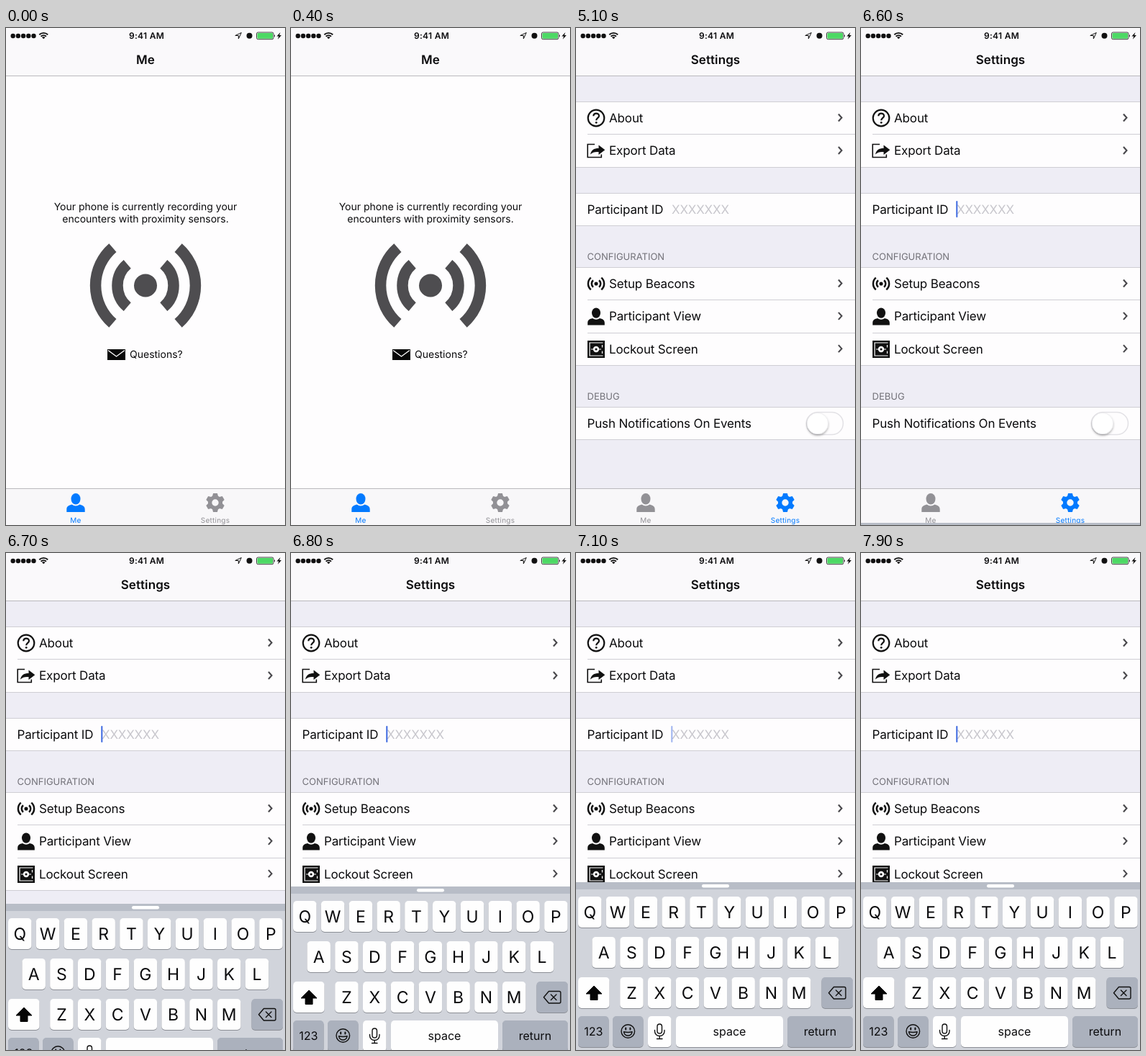
Recreate the animation shown at these times as an HTML page. Size 388 px wide and 690 px high, loop 8000 ms.

```html
<!DOCTYPE html>
<html lang="en">
<head>
<meta charset="utf-8">
<title>Settings walkthrough</title>
<style>
  html, body { margin: 0; width: 100%; height: 100%; overflow: hidden; background: #fefdfe; }
  svg { display: block; width: 388px; height: 690px; }
  text { font: 17px Inter, "Liberation Sans", sans-serif; letter-spacing: -.15px; fill: #0b0b0d; text-rendering: geometricPrecision; }
  .mid { text-anchor: middle; }
  .title { font-weight: 600; letter-spacing: .1px; }
  .note { font-size: 14px; letter-spacing: 0; }
  .head { font-size: 13px; letter-spacing: 0; fill: #717077; }
  .hint { fill: #c7c6cc; letter-spacing: -.2px; }
  .tab { font-size: 10px; letter-spacing: .25px; fill: currentColor; }
  .clock { font-size: 12px; font-weight: 600; letter-spacing: .3px; }
  .letter { font-size: 23px; letter-spacing: 0; }
  .word { font-size: 16px; letter-spacing: 0; }
  .line { fill: none; stroke: #111; }
</style>
</head>
<body>
<svg viewBox="0 0 388 690">
  <defs>
    <g id="signal">
      <circle r="16" fill="currentColor"/>
      <g id="waves" fill="none" stroke="currentColor" stroke-width="15.5">
        <path d="M25.3-29.7A39 39 0 0 1 25.3 29.7M45.6-52.4A69.5 69.5 0 0 1 45.6 52.4"/>
      </g>
      <use href="#waves" transform="scale(-1 1)"/>
    </g>
    <g id="person" fill="currentColor">
      <ellipse cy="-5.3" rx="6.5" ry="7.7"/>
      <path d="M-12.7 13V9.5C-12.7 5-9.5 3.7-5.5 2.6Q0 6.5 5.5 2.6C9.5 3.7 12.7 5 12.7 9.5V13z"/>
    </g>
    <g id="gear" fill="currentColor">
      <circle r="7.4" fill="none" stroke="currentColor" stroke-width="5.4"/>
      <g id="teeth"></g>
    </g>
    <filter id="soft" x="-50%" y="-50%" width="200%" height="200%">
      <feDropShadow dx="0" dy="2" stdDeviation="1.8" flood-opacity=".3"/>
    </filter>
  </defs>

  <g id="mePage">
    <rect width="388" height="690" fill="#fefdfe"/>
    <text class="note mid" x="194" y="253">Your phone is currently recording your</text>
    <text class="note mid" x="194" y="270">encounters with proximity sensors.</text>
    <use href="#signal" x="194" y="357.5" color="#4e4d50"/>
    <rect x="141" y="446" width="25" height="15" fill="#080808"/>
    <path d="M142 447.5L153.5 456L165 447.5" fill="none" stroke="#fefdfe" stroke-width="1.4"/>
    <text class="note" x="172" y="458">Questions?</text>
  </g>

  <g id="settingsPage">
    <rect y="67" width="388" height="573" fill="#eeedf5"/>
    <g id="rows"></g>
    <text class="head" x="15.5" y="322">CONFIGURATION</text>
    <text class="head" x="15.5" y="516">DEBUG</text>
    <text class="hint" x="133" y="258">XXXXXXX</text>
    <rect id="caret" x="132.3" y="240" width="2" height="23" rx="1" fill="#3c68e0"/>

    <circle class="line" cx="28" cy="125" r="11.3" stroke-width="2.2"/>
    <path class="line" d="M24.3 122.3C24.3 117.5 32 117.5 32 122C32 125 28.2 124.8 28.2 128.3" stroke-width="2.2"/>
    <circle cx="28.2" cy="131.3" r="1.4" fill="#111"/>

    <path class="line" d="M26 161.5H16.2V179.5H35.3V175.5" stroke-width="1.6"/>
    <path d="M20 175.5C21 169.5 25 167 31.5 167V162.5L40.3 169.3L31.5 176V172C26 171.7 23 172.5 20 175.5z" fill="#111"/>

    <use href="#signal" transform="translate(28 355) scale(.16)" color="#111"/>
    <use href="#person" transform="translate(28 400.5) scale(.93)" color="#111"/>

    <rect x="16" y="434" width="24" height="24" fill="#111"/>
    <path d="M37.5 437H19V455H37.5M36.5 440V443.5M36.5 448.5V452" fill="none" stroke="#fefdfe" stroke-width="1.2"/>
    <circle cx="28" cy="446" r="4.2" fill="#fefdfe"/>
    <circle cx="28" cy="446" r="1.6" fill="#111"/>
    <path d="M21 446H24M32 446H35" stroke="#fefdfe"/>

    <rect x="320.5" y="533.5" width="51" height="31" rx="15.5" fill="#fefdfe" stroke="#e2e1e5" stroke-width="1.5"/>
    <circle cx="336" cy="549" r="14.7" fill="#fff" stroke="#dddce0" stroke-width=".5" filter="url(#soft)"/>
  </g>

  <rect width="388" height="66" fill="#faf9fb"/>
  <rect y="66" width="388" height="1" fill="#bab9bd"/>
  <g id="dots"></g>
  <path class="line" d="M46.3 9.3A8.5 8.5 0 0 1 58.2 9.3M48.6 11.7A5.2 5.2 0 0 1 55.9 11.7" stroke-width="1.9"/>
  <path d="M50 13A3 3 0 0 1 54.5 13L52.25 15.3z" fill="#111"/>
  <text class="clock mid" x="195.5" y="15">9:41 AM</text>
  <path class="line" d="M327.3 6.5L318.8 10.5H323.3V15z" stroke-linejoin="round"/>
  <circle cx="338.5" cy="10.7" r="4" fill="#111"/>
  <rect class="line" x="348.5" y="6" width="23.5" height="9.7" rx="2" stroke-width=".8"/>
  <rect x="349.5" y="7" width="21.5" height="7.7" rx="1" fill="#4cd964"/>
  <path d="M373 9Q375 10.8 373 12.7z" fill="#111"/>
  <path d="M381.5 6L376.5 11.5H379.3L378 15.7L383 10H380.2z" fill="#111"/>
  <text id="title" class="title mid" x="194" y="50"></text>

  <rect y="639" width="388" height="51" fill="#f8f7f9"/>
  <rect y="639" width="388" height="1" fill="#bab9bd"/>
  <g id="meTab">
    <use href="#person" x="97" y="659"/>
    <text class="tab mid" x="97" y="686.5">Me</text>
  </g>
  <g id="settingsTab">
    <use href="#gear" x="291" y="659"/>
    <text class="tab mid" x="291" y="686.5">Settings</text>
  </g>

  <g id="keyboard">
    <rect width="388" height="240" fill="#d1d4db"/>
    <rect width="388" height="10" fill="#b8bdc7"/>
    <rect x="175" y="3" width="38" height="4.5" rx="2.25" fill="#fff"/>
    <g id="keys"></g>
    <path d="M25 144L36 155H30V163.5H20V155H14z" fill="#050505" stroke="#050505" stroke-linejoin="round"/>
    <g class="line" stroke-width="1.4" stroke-linejoin="round" stroke-linecap="round">
      <path d="M358.5 145.5H373Q375 145.5 375 147.5V160Q375 162 373 162H358.5L351.5 153.75zM361.5 150L369 157.5M369 150L361.5 157.5"/>
      <circle cx="72.3" cy="207" r="9.3"/>
      <path d="M69.2 202.5V204.5M75.4 202.5V204.5" stroke-width="2"/>
      <path d="M66.5 207.8Q72.3 209.3 78.1 207.8Q77 213 72.3 213T66.5 207.8z"/>
      <rect x="113" y="197" width="6.5" height="13" rx="3.25"/>
      <path d="M109.5 205.5V207A6.7 6.5 0 0 0 123 207V205.5M116.2 213.5V217.5M112.5 217.5H120"/>
    </g>
  </g>
</svg>
<script>
const $ = id => document.getElementById(id);
const rect = (x, y, w, h, fill, r = 0) =>
  `<rect x="${x}" y="${y}" width="${w}" height="${h}" rx="${r}" fill="${fill}"/>`;
const repeat = (n, make) => Array.from({ length: n }, (_, i) => make(i)).join("");

$("teeth").innerHTML = repeat(6, i =>
  `<path d="M-2.9-13H2.9L4.3-8H-4.3z" transform="rotate(${i * 60})"/>`);
$("dots").innerHTML = repeat(5, i =>
  `<circle cx="${9.7 + i * 7.2}" cy="11" r="3.2" fill="#111"/>`);

// Each section: top, bottom, then rows as [label, text x, has chevron].
const sections = [
  [102, 193, ["About", 46, 1], ["Export Data", 46, 1]],
  [229, 274, ["Participant ID", 15.5, 0]],
  [332, 468, ["Setup Beacons", 46, 1], ["Participant View", 46, 1], ["Lockout Screen", 46, 1]],
  [526, 571, ["Push Notifications On Events", 15.5, 0]]
];
$("rows").innerHTML = sections.map(([top, bottom, ...rows]) => {
  const border = "#cfced4";
  const height = (bottom - top) / rows.length;
  return rect(0, top, 388, bottom - top + 1, border) +
    rect(0, top + 1, 388, bottom - top - 1, "#fefdfe") +
    rows.map(([label, x, chevron], i) => {
      const y = top + i * height;
      return (i ? rect(16, Math.ceil(y - .5), 372, 1, border) : "") +
        `<text x="${x}" y="${Math.round(y + 28.9)}">${label}</text>` +
        (chevron ? `<path d="M365 ${y + 17.5}l4.5 5-4.5 5" fill="none" stroke="#48474b" stroke-width="2.1"/>` : "");
    }).join("");
}).join("");

const key = (x, y, w, label = "", style = "letter", fill = "#fefefe") =>
  rect(x, y + 1, w, 43, "#8b8e95", 5) + rect(x, y, w, 43, fill, 5) +
  `<text class="mid ${style}" x="${x + w / 2}" y="${y + (style === "letter" ? 30 : 27)}">${label}</text>`;
const letters = (text, x, y) =>
  [...text].map((c, i) => key(x + i * 38.8, y, 32.5, c)).join("");
const dark = "#abb1bd";
$("keys").innerHTML =
  letters("QWERTYUIOP", 3, 20) + letters("ASDFGHJKL", 22.4, 76) + letters("ZXCVBNM", 61.2, 132) +
  key(3, 132, 43.5) + key(341.5, 132, 43.5, "", "word", dark) +
  key(3, 186, 42.5, "123", "word", dark) + key(51, 186, 42.5, "", "word", dark) +
  key(100, 186, 32.5) + key(139, 186, 149, "space", "word") +
  key(294, 186, 91, "return", "word", dark);

const LOOP = 8, SETTINGS_AT = 3.4, FOCUS_AT = 6.6;
const clamp = v => Math.max(0, Math.min(1, v));

// Critically damped slide, 1 at rest below the stage and 0 when fully up.
function slide(t) {
  if (t < FOCUS_AT + .1) return 1;
  const x = 18.6 * (t - FOCUS_AT + .092);
  return (1 + x) * Math.exp(-x);
}

function draw(now) {
  const t = Math.floor(now / 100) / 10 % LOOP + 1e-6;
  const settings = t >= SETTINGS_AT;
  const focused = t >= FOCUS_AT;
  const blue = "#037aff", grey = "#929196";

  $("mePage").style.display = settings ? "none" : "";
  $("settingsPage").style.display = settings ? "" : "none";
  $("title").textContent = settings ? "Settings" : "Me";
  $("meTab").style.color = settings ? grey : blue;
  $("settingsTab").style.color = settings ? blue : grey;

  const blink = clamp((7.2 - t) / .2) + clamp((t - 7.4) / .3);
  $("caret").style.opacity = focused ? blink : 0;
  $("keyboard").style.display = focused ? "" : "none";
  $("keyboard").setAttribute("transform", `translate(0 ${Math.round(457 + 230 * slide(t))})`);
  requestAnimationFrame(draw);
}
draw(performance.now());
</script>
</body>
</html>
```
